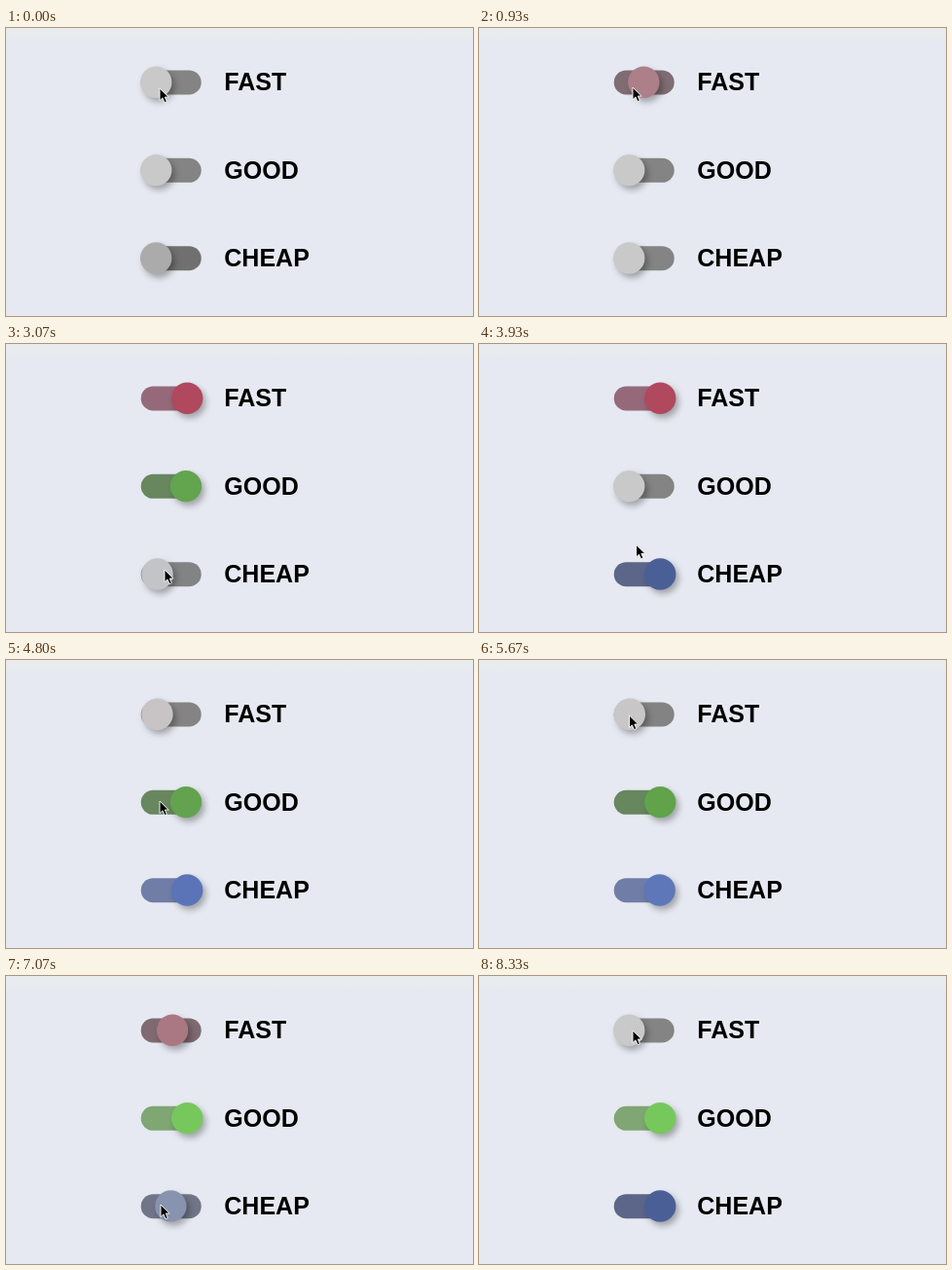
Animation of 480 by 296 pixels, one loop 8.39 s. Source, as an HTML page:

```html
<!DOCTYPE html>
<html lang="en">
<head>
<meta charset="utf-8">
<title>Fast, good, cheap</title>
<style>
  html, body { margin: 0; width: 100%; height: 100%; overflow: hidden; background: #e6e9f1; }
  svg { display: block; width: 480px; height: 296px; }
  text { font: bold 25px "Liberation Sans", Arial, sans-serif; }
  circle { filter: drop-shadow(3px 4px 3px rgba(0, 0, 0, .3)); }
</style>
</head>
<body>
<svg viewBox="0 0 480 296">
  <defs>
    <linearGradient id="top" x2="0" y2="1">
      <stop offset=".6" stop-color="#e9ecee"/>
      <stop offset="1" stop-color="#e6e9f1"/>
    </linearGradient>
  </defs>
  <rect width="480" height="13" fill="url(#top)"/>
  <g id="rows"></g>
  <path id="cursor" d="M0 0V12.6L2.9 9.9L5 14.6L7.3 13.6L5.3 9H9.2Z"
    fill="#000" stroke="#fff" stroke-width=".9"/>
</svg>
<script>
const LOOP = 8390, TURN = 500;
const KNOB_OFF = [201, 201, 201], TRACK_OFF = [132, 132, 132];

// flips: times the switch changes state; focus: times it gains or loses focus
const switches = [
  { label: 'FAST', y: 55.7, knob: [176, 72, 94], track: [149, 105, 121],
    flips: [690, 4360, 5630, 6830], focus: [690, 1830, 5630, 6830] },
  { label: 'GOOD', y: 146.1, knob: [118, 200, 92], track: [127, 166, 115],
    flips: [1830, 3010, 4360], focus: [1830, 3010, 4360, 5630] },
  { label: 'CHEAP', y: 236.5, knob: [91, 117, 184], track: [112, 126, 168],
    flips: [3010, 5630, 6830], focus: [3010, 4360, 6830], fade: 0.8 }
];

// Pointer tip: time, x, y
const pointer = [
  [0, 158, 62], [400, 158, 62], [530, 158, 61], [1300, 158, 61],
  [1600, 158, 142], [2700, 158, 142], [2960, 163, 232], [3780, 163, 232],
  [4200, 158, 145], [5230, 158, 145], [5470, 154.5, 57], [6480, 154.5, 57],
  [6730, 159, 235], [7680, 159, 235], [8000, 158, 56]
];

const cursor = document.getElementById('cursor');
const clamp = u => Math.min(1, Math.max(0, u));
const ease = u => (u = clamp(u), u * u * (3 - 2 * u));
const mix = (a, b, u) => a + (b - a) * u;
const level = (times, t) =>
  times.reduce((sum, at, i) => sum + (i % 2 ? -1 : 1) * ease((t - at) / TURN), 0);
const shade = (a, b, u, light) =>
  `rgb(${a.map((v, i) => Math.round(mix(v, b[i], u) * light))})`;

function add(tag, attrs) {
  const el = document.createElementNS('http://www.w3.org/2000/svg', tag);
  for (const key in attrs) el.setAttribute(key, attrs[key]);
  return document.getElementById('rows').appendChild(el);
}

for (const s of switches) {
  s.bar = add('rect', { x: 138.7, y: s.y - 12.3, width: 62, height: 25, rx: 12.5 });
  s.dot = add('circle', { cy: s.y, r: 16.2 });
  add('text', { x: 224.3, y: s.y + 8.6 }).textContent = s.label;
}

function draw(t) {
  for (const s of switches) {
    const on = level(s.flips, t);
    const dim = level(s.focus, t) + (s.fade || 0) * clamp(1 - t / 230);
    const light = 1 - 0.19 * dim;
    s.dot.setAttribute('cx', mix(154.2, 186.2, on));
    s.dot.setAttribute('fill', shade(KNOB_OFF, s.knob, on, light));
    s.bar.setAttribute('fill', shade(TRACK_OFF, s.track, on, light));
  }
  const i = pointer.findLastIndex(p => p[0] <= t);
  const a = pointer[i], b = pointer[i + 1] || a;
  const u = a === b ? 0 : ease((t - a[0]) / (b[0] - a[0]));
  cursor.setAttribute('transform', `translate(${mix(a[1], b[1], u)} ${mix(a[2], b[2], u)})`);
}

const start = performance.now();
function frame() {
  draw((performance.now() - start) % LOOP);
  requestAnimationFrame(frame);
}
frame();
</script>
</body>
</html>
```
